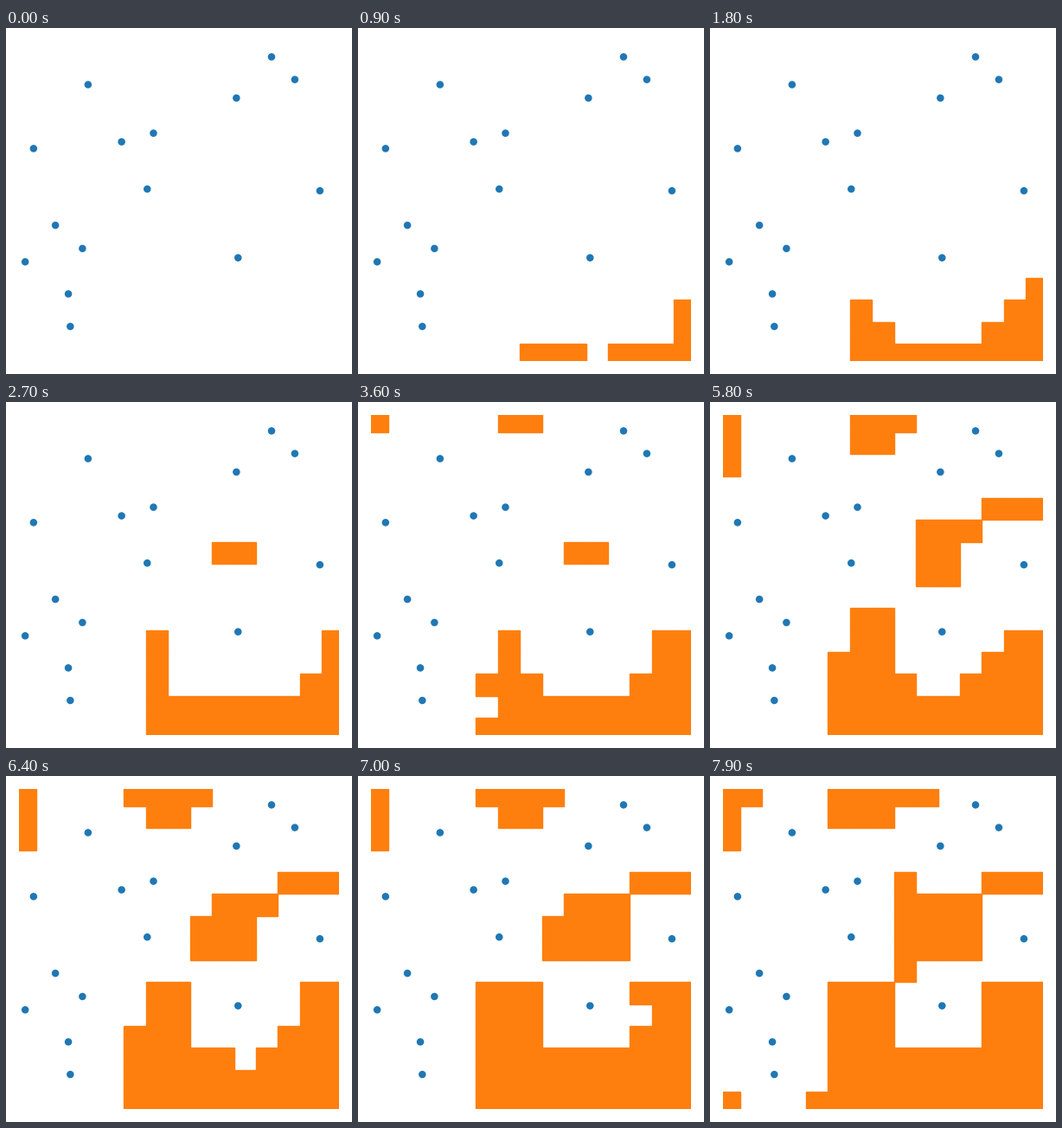
A matplotlib script for the animation above (8 s loop, 400 by 400 pixels).

```python
import matplotlib.pyplot as plt
import numpy as np
from matplotlib.animation import FuncAnimation
from matplotlib.patches import Circle, Rectangle

N_POINTS = 15
MIN_GAP = 0.1
GRID = 15
FRAMES = 80
PAD = 0.0375  # 15 px margin


def scatter_points(n, gap):
    """Random points in the unit square, no two closer than gap."""
    rng = np.random.RandomState(1)
    points = []
    while len(points) < n:
        p = rng.rand(2)
        if all(np.hypot(*(p - q)) >= gap for q in points):
            points.append(p)
    return np.array(points)


def cells_by_emptiness(points):
    """Grid nodes, the farthest from any point first (Minkowski, p = 3)."""
    axis = np.linspace(0, 1, GRID)
    nodes = np.array([(x, y) for x in axis for y in axis])
    cubes = np.abs(nodes[:, None] - points[None]) ** 3
    dist = cubes.sum(axis=2).min(axis=1)
    return nodes[np.argsort(-dist, kind="stable")]


fig = plt.figure(figsize=(4, 4), dpi=100, facecolor="white")
ax = fig.add_axes([PAD, PAD, 1 - 2 * PAD, 1 - 2 * PAD])
ax.set_xlim(-0.02, 1.02)
ax.set_ylim(-0.02, 1.02)
ax.axis("off")

points = scatter_points(N_POINTS, MIN_GAP)
for p in points:
    ax.add_patch(Circle(p, 0.01, color="C0", lw=1))

side = 1 / (GRID - 1)
cells = []
for x, y in cells_by_emptiness(points)[:FRAMES - 1]:
    cell = Rectangle((x - side / 2, y - side / 2), side, side, color="C1", lw=1)
    cells.append(ax.add_patch(cell))


def update(frame):
    for i, cell in enumerate(cells):
        cell.set_visible(i < frame)
    return cells


anim = FuncAnimation(fig, update, frames=FRAMES, interval=100, repeat=True,
                     repeat_delay=0, blit=False)
plt.show()
```
